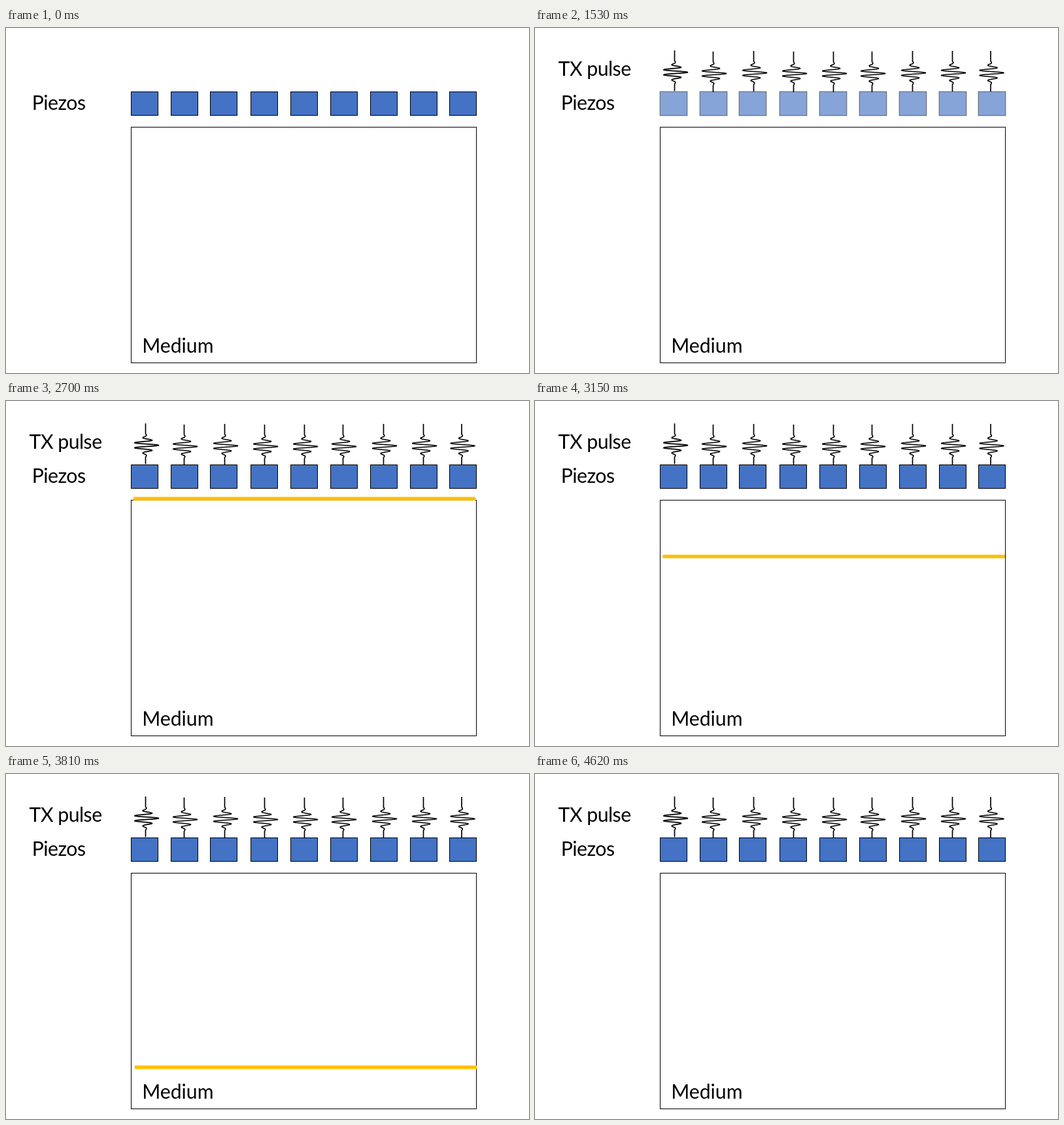
These frames come from a looping animation (800 px wide and 527 px high, 4890 ms). An HTML page:

```html
<!DOCTYPE html>
<html lang="en">
<head>
<meta charset="utf-8">
<title>Plane wave transmission</title>
<style>
  html, body { margin: 0; width: 100%; height: 100%; overflow: hidden; background: #fff; }
  svg { display: block; width: 800px; height: 527px; }
  text { font: 30.2px Lato, Carlito, sans-serif; fill: #000; }
  .tight { letter-spacing: -0.5px; }
  .box { fill: #4472c4; stroke: #000; }
  .wave { fill: none; stroke: #000; stroke-width: 1.7; stroke-linejoin: round; }
</style>
</head>
<body>
<svg viewBox="0 0 800 527">
  <rect x="191.5" y="151.5" width="528" height="360" fill="none" stroke="#000"/>
  <text class="tight" x="39.7" y="124.5">Piezos</text>
  <text x="208.2" y="496.2">Medium</text>
  <g id="piezos"></g>
  <g id="tx"><text class="tight" x="35.6" y="73">TX pulse</text></g>
  <rect id="front" width="523.5" height="5.4" fill="#ffc000"/>
</svg>
<script>
const LOOP = 4890, STEP = 30;
const PULSE_START = 1380, PULSE_END = 2430, FRONT_END = 4500;
const boxX = [191.5, 252.5, 312.5, 374.5, 435.5, 496.5, 557.5, 618.5, 678.5];
const waveX = [213.5, 272.5, 334.5, 395.5, 456.5, 515.5, 577.5, 638.5, 697];
const waveY = [68.2, 70, 69, 70, 70, 70, 69, 69, 69];
// Time and height of the wave front along its path
const path = [[2430, 146.5], [2700, 149.2], [2970, 186], [3150, 237.5], [3450, 345.5],
              [3810, 448], [4080, 479], [4200, 484.5]];

const el = id => document.getElementById(id);
const piezos = el('piezos'), tx = el('tx'), front = el('front');

function add(parent, tag, attrs) {
  const node = document.createElementNS('http://www.w3.org/2000/svg', tag);
  for (const k in attrs) node.setAttribute(k, attrs[k]);
  return parent.appendChild(node);
}

// A vertical wave packet: a cosine under a bell curve
function packet(cx, cy) {
  let d = `M${cx} ${cy - 34}`;
  for (let y = -18; y <= 18; y += 0.25) {
    const x = 20 * Math.cos(2 * Math.PI * y / 8) * Math.exp(-((y / 9.5) ** 2));
    d += `L${(cx + x).toFixed(2)} ${(cy + y - 0.5).toFixed(2)}`;
  }
  return d + `L${cx} ${cy + 28}`;
}

const boxes = boxX.map(x =>
  add(piezos, 'rect', { class: 'box', x, y: 97.5, width: 41, height: 36 }));
waveX.forEach((x, i) => add(tx, 'path', { class: 'wave', d: packet(x, waveY[i]) }));

const slope = i => i <= 0 || i >= path.length - 1 ? 0 :
  (path[i + 1][1] - path[i - 1][1]) / (path[i + 1][0] - path[i - 1][0]);

// Cubic Hermite curve through the path points
function frontY(t) {
  const last = path.length - 1;
  if (t >= path[last][0]) return path[last][1];
  const i = Math.max(0, path.findIndex(p => p[0] > t) - 1);
  const [t0, y0] = path[i], [t1, y1] = path[i + 1];
  const h = t1 - t0, u = (t - t0) / h, v = 1 - u;
  return v * v * ((1 + 2 * u) * y0 + u * h * slope(i)) +
         u * u * ((1 + 2 * v) * y1 - v * h * slope(i + 1));
}

function draw(t) {
  tx.style.display = t >= PULSE_START ? '' : 'none';

  // Piezos turn half transparent and swell by 5 %
  const p = Math.min(1, Math.max(0, (t - PULSE_START) / (PULSE_END - PULSE_START)));
  const edge = Math.min(p, 1 - p);
  const s = 1 + 0.1 * edge;
  boxes.forEach((box, i) => {
    const x = boxX[i] + 20.5, y = 115.5;
    box.setAttribute('opacity', 1 - 0.5 * Math.min(1, edge / 0.2));
    box.setAttribute('transform', `translate(${x} ${y}) scale(${s}) translate(${-x} ${-y})`);
  });

  const shown = t >= PULSE_END && t < FRONT_END;
  front.style.display = shown ? '' : 'none';
  if (shown) {
    const y = frontY(t);
    front.setAttribute('x', 194.8 + 2.3 * (y - path[0][1]) / 338);
    front.setAttribute('y', y - 2.7);
  }
}

const begin = performance.now();
function tick() {
  const t = (performance.now() - begin) % LOOP;
  draw(Math.floor(t / STEP) * STEP);
  requestAnimationFrame(tick);
}
tick();
</script>
</body>
</html>
```
